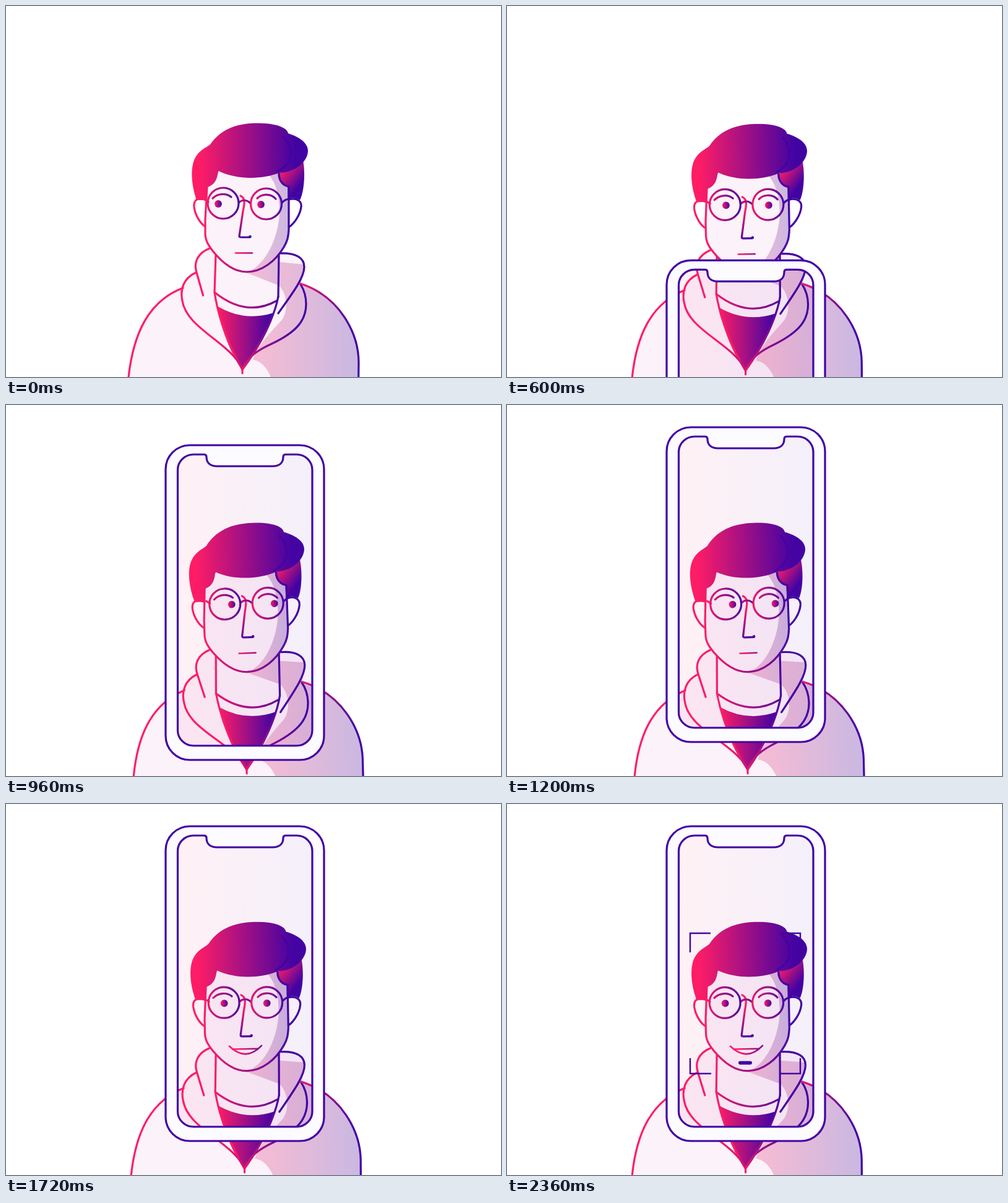
Recreate the animation shown at these times as an HTML page. Size 800 px wide and 600 px high, loop 2.4 s.

```html
<!DOCTYPE html>
<html lang="en">
<head>
<meta charset="utf-8">
<title>Face scan</title>
<style>
html, body { margin: 0; width: 100%; height: 100%; overflow: hidden; background: #fff; }
svg { display: block; width: 100%; height: 100%; }
.line { fill: none; stroke-width: 3.2; stroke-linecap: round; stroke-linejoin: round; }
.pink { stroke: #ff1d66; }
.ink { stroke: #4203a3; }
.skin { fill: #fcf2fa; }
</style>
</head>
<body>
<svg viewBox="0 0 800 600">
  <defs>
    <linearGradient id="duo"><stop offset="0" stop-color="#ff1d66"/><stop offset="1" stop-color="#4203a3"/></linearGradient>
    <linearGradient id="pale"><stop offset="0" stop-color="#f7bcd3"/><stop offset="1" stop-color="#c9b8e2"/></linearGradient>
    <g id="grads"></g>
    <path id="bodyShape" d="M191 660L198 600C206 530 230 477 286 456C290 444 297 436 307 431C303 412 312 398 329 392L443 400C470 399 482 408 482 422C482 432 478 440 476 449C540 470 570 530 570 577L569 660Z"/>
    <path id="headShape" d="M325 292L322 345V368C322 380 328 388 334 396C350 416 368 430 389 430C414 430 436 412 449 390C455 380 456 374 457 362V292"/>
    <clipPath id="bodyClip"><use href="#bodyShape"/></clipPath>
    <clipPath id="headClip"><path d="M325 250L322 345V368C322 380 328 388 334 396C350 416 368 430 389 430C414 430 436 412 449 390C455 380 456 374 457 362V250Z"/></clipPath>
  </defs>

  <g id="figure">
    <use href="#bodyShape" class="skin"/>
    <g clip-path="url(#bodyClip)">
      <path fill="url(#bodyShade)" d="M441 414L482 418L600 400V660H445L428 600C421 583 411 574 399 572C408 548 425 530 443 511C456 498 457 468 441 452Z"/>
    </g>
    <path fill="url(#neckShade)" d="M380 428L441 452V395Z"/>
    <path fill="url(#shirt)" d="M341 485Q385 511.500 433 496C425 525 405 560 382 588C362 560 350 528 341 485Z"/>
    <path class="line" stroke="url(#jaw)" d="M337 463Q388 504 437 477"/>
    <path class="line pink" d="M198 600L191 660M198 600C206 530 230 477 286 456M329 392C309 400 303 415 308 431L318.500 468M339 403L337 463C344 510 363 556 382 588V594"/>
    <path class="line" stroke="url(#lapel)" d="M307 431C287 440 281 458 285 477C292 521 360 543 382 586C392 566 408 556 430 546C470 527 485 508 485 482C485 467 481 458 476 450"/>
    <path class="line" stroke="url(#collar)" d="M440 470C434 502 412 548 382 588"/>
    <path class="line ink" d="M441 402L440 470M443 400C470 399 482 408 482 422C482 440 462 466 440 497"/>
    <path class="line" stroke="url(#shoulder)" d="M476 449C540 470 570 530 570 577L569 660"/>

    <path class="line pink" style="fill:#fff" d="M324 314C308 308 303 315 304 325C306 340 315 352 321 356"/>
    <path class="line ink" style="fill:#fff" d="M456 313C472 309 478 317 477 325C475 340 464 353 458 357"/>
    <g clip-path="url(#headClip)">
      <path class="skin" d="M310 240H470V440H310Z"/>
      <path fill="url(#faceShade)" d="M420 268C438 285 442 310 442 335C440 375 420 420 388 431L470 440V268Z"/>
    </g>
    <use href="#headShape" class="line" stroke="url(#jaw)"/>
    <path fill="url(#sideHair)" d="M441 270C460 268 472 262 480 249C484 270 482 300 475 314C470 311 464 309 457 312V292C450 291 441 285 441 270Z"/>
    <path class="line ink" d="M441 271C441 285 450 291 457 292V312"/>
    <path fill="url(#hair)" d="M308 314C299 288 298 262 305 247C312 233 322 230 330 224C350 195 380 189 410 189.500C440 190 455 198 456 206C475 212 488 222 488 234C488 250 470 269 441 270C415 280 375 282 344 267C341 268 344 288 325 293L324 314Z"/>
    <path class="line ink" d="M449 212C465 230 464 255 438 268"/>

    <g id="face">
      <path class="line" stroke="url(#nose)" d="M379 307C388 311 385 322 383 332L377 372Q377 374 380 374L394 374"/>
      <circle cx="394.500" cy="373" r="2.300" fill="#4203a3"/>
      <g id="glasses">
        <path class="line pink" d="M321 313L327 317"/>
        <path class="line ink" d="M446 318C450 314 454 312 458 312"/>
        <path class="line" stroke="url(#bridge)" d="M376 318C382 313 389 313 395 319"/>
        <circle class="line" stroke="url(#lensL)" cx="351" cy="319" r="25"/>
        <circle class="line" stroke="url(#lensR)" cx="420.500" cy="320" r="25"/>
        <path class="line" stroke="url(#lensL)" d="M334 311C342 303 356 302 364 309"/>
        <path class="line" stroke="url(#lensR)" d="M406 311C413 304 427 302 436 312"/>
      </g>
      <ellipse class="eye" cy="320" rx="5.900" fill="url(#duo)"/>
      <ellipse class="eye" cy="321" rx="5.900" fill="url(#duo)"/>
      <path id="lip" class="line" style="stroke-width:2.600" stroke="url(#mouth)"/>
      <path id="teeth" class="line" style="stroke-width:2.400" stroke="url(#mouth)"/>
    </g>
  </g>

  <g id="phone">
    <path fill="url(#glass)" opacity=".06" d="M277.500 51H495V522H277.500Z"/>
    <path id="frame" class="line ink" style="fill:#fcfbff" fill-rule="evenodd" d="M297 36H475A39 39 0 0 1 514 75V506A39 39 0 0 1 475 545H297A39 39 0 0 1 258 506V75A39 39 0 0 1 297 36Z
      M303 51H320Q324 51 324 55C324 65 331 70 341 70H431C441 70 448 65 448 55Q448 51 452 51H470A25 25 0 0 1 495 76V497A25 25 0 0 1 470 522H303A25.500 25 0 0 1 277.500 497V76A25.500 25 0 0 1 303 51Z"/>
  </g>
  <path id="corners" class="ink" fill="none"/>
  <rect id="bar" y="415.800" height="5.600" rx="2.800" fill="#4203a3"/>
</svg>
<script>
const LOOP = 2400;
const $ = id => document.getElementById(id);
const eyes = document.querySelectorAll('.eye');

// name: [base gradient, x1, x2, y1, y2]
const grads = {
  bodyShade: ['pale', 400, 570], neckShade: ['pale', 390, 480], faceShade: ['pale', 390, 460],
  shirt: ['duo', 341, 428], jaw: ['duo', 325, 457], lapel: ['duo', 340, 470],
  collar: ['duo', 375, 440], shoulder: ['duo', 470, 560], hair: ['duo', 312, 468],
  sideHair: ['duo', 445, 476, 264, 288], nose: ['duo', 376, 394, 330, 374],
  bridge: ['duo', 365, 400], lensL: ['duo', 318, 378], lensR: ['duo', 390, 448],
  mouth: ['duo', 372, 425], glass: ['duo', 277, 495]
};
$('grads').innerHTML = Object.entries(grads).map(([id, [base, x1, x2, y1 = 0, y2 = 0]]) =>
  `<linearGradient id="${id}" href="#${base}" gradientUnits="userSpaceOnUse" x1="${x1}" x2="${x2}" y1="${y1}" y2="${y2}"/>`).join('');

const span = (t, a, b) => Math.min(1, Math.max(0, (t - a) / (b - a)));
const ease = (t, a, b) => { const p = span(t, a, b); return p * p * (3 - 2 * p); };
const cubic = p => p < .5 ? 4 * p ** 3 : 1 - 4 * (1 - p) ** 3;
const move = (el, x, y) => el.setAttribute('transform', `translate(${x} ${y})`);

function drawMouth(s) {
  const cx = 384.5, w = 13.5 + 12.5 * s, y = 399.5 - 10 * s, low = 399.5 + 3 * s;
  $('lip').setAttribute('d', `M${cx - w} ${y}Q${cx} ${2 * low - y} ${cx + w} ${y}`);
  const tw = 13.5 + 7 * s, ty = 399.5 - 5.2 * s;
  $('teeth').setAttribute('d', s > 0 ? `M${cx - tw} ${ty}H${cx + tw}` : '');
}

function drawCorners(t) {
  const k = ease(t, 2155, 2360);
  const l = 352 - 56 * k, r = 418 + 56 * k, top = 288 - 79 * k, bottom = 344 + 92 * k;
  const corner = (x, y, w, h) => `M${x} ${y + h}V${y}H${x + w}`;
  const el = $('corners');
  el.setAttribute('d', corner(l, top, 33, 31) + corner(r, top, -33, 31) +
    corner(l, bottom, 34, -25) + corner(r, bottom, -33, -25));
  el.setAttribute('stroke-width', 2 + .4 * k);
  el.setAttribute('opacity', span(t, 1870, 1990));
}

function draw(t) {
  const turn = ease(t, 240, 960), back = ease(t, 1160, 1660);
  const bob = 1.7 * ease(t, 0, 200);
  const angle = 2.1 * turn - 1.05 * back;
  $('figure').setAttribute('transform', `translate(0 ${bob}) rotate(${-angle} 390 398)`);
  move($('face'), 5.6 * turn - 3 * back, 0);
  move($('glasses'), 0, -2 * (ease(t, 1320, 1500) - ease(t, 1560, 1760)));

  const look = -8.5 + 19 * turn - 10.5 * back;
  const open = 1 - .72 * (ease(t, 120, 220) - ease(t, 260, 360));
  eyes.forEach((eye, i) => {
    eye.setAttribute('cx', (i ? 420.5 : 351.5) + look);
    eye.setAttribute('ry', 5.9 * open);
  });
  drawMouth(ease(t, 1320, 1640));

  move($('phone'), 0, 574 * (1 - cubic(span(t, 111, 1219))));
  drawCorners(t);

  const w = 22 * ease(t, 2240, 2350);
  $('bar').setAttribute('x', 385 - w / 2);
  $('bar').setAttribute('width', w);
}

function tick() {
  draw(performance.now() % LOOP);
  requestAnimationFrame(tick);
}
tick();
</script>
</body>
</html>
```
